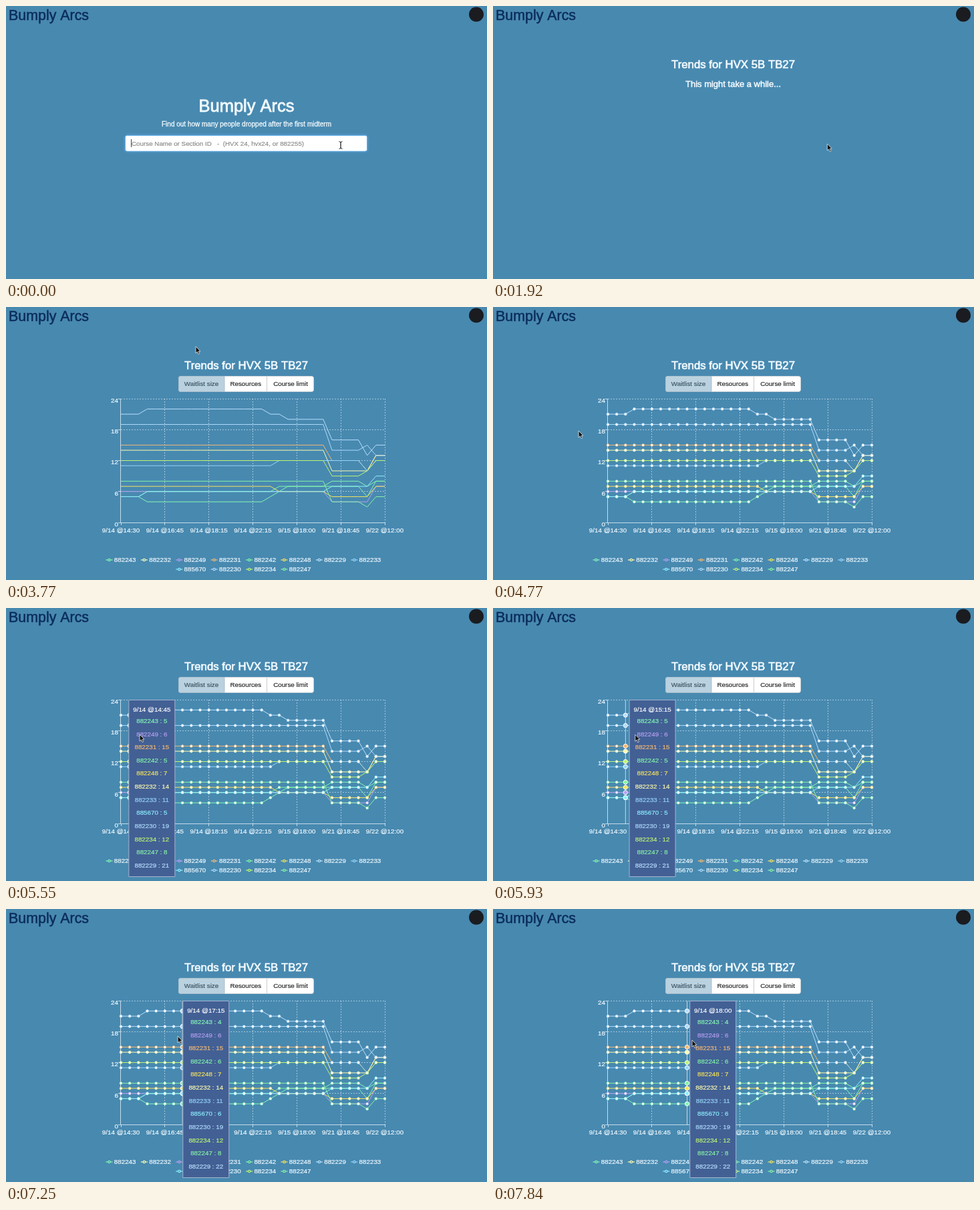
Animation, 720 px wide and 408 px high, one loop 7990 ms. Source, as an HTML page with a canvas:

```html
<!DOCTYPE html>
<html lang="en">
<head>
<meta charset="utf-8">
<title>Course trends</title>
<style>
html, body { margin: 0; width: 100%; height: 100%; overflow: hidden; background: #4889b0; }
canvas { display: block; width: 720px; height: 408px; }
</style>
</head>
<body>
<canvas id="stage" width="720" height="408"></canvas>
<script>
const ctx = document.getElementById('stage').getContext('2d');
const LOOP = 7990;
const FONT = '"Liberation Sans", Arial, sans-serif';
const PALE = '#f3fbff', AXIS = '#c3dbe9', GRID = 'rgba(225,238,246,.6)';
const SITE = 'Bumply Arcs';
const HEADING = 'Trends for HVX 5B TB27';
const HINT = 'Course Name or Section ID   -  (HVX 24, hvx24, or 882255)';
const QUERY = 'hvx 5b';

// Milestones in ms
const BLINK = 440, TYPE_WORD = 680, TYPE_NUMBER = 1390;
const RESULT = 1920, CHART = 2330, DRAW = 2430, DRAW_LEN = 1100, DOTS = 4070;

// Pointer: time, x, y
const pointer = [
  [RESULT, 500.3, 206], [2010, 500.3, 206], [2500, 591, 76], [2800, 591, 76], [3350, 300, 57],
  [3770, 284, 59], [3980, 284, 59], [4770, 128, 185], [5550, 200, 189], [7250, 257, 190], [7840, 298, 196]
];
// Hovered column: time, column
const hover = [[5250, 0], [5530, 1], [6510, 4], [7215, 7], [7780, 9]];
// Sample clock: column, quarter hours after 14:30
const clock = [[0, 0], [1, 1], [4, 8], [7, 11], [9, 14]];

const ticks = ['9/14 @14:30', '9/14 @16:45', '9/14 @18:15', '9/14 @22:15',
  '9/15 @18:00', '9/21 @18:45', '9/22 @12:00'];

// All series hold one level per span of columns and ramp in between
const spans = [[0, 2], [3, 16], [19, 23], [24, 27], [28, 28], [29, 30]];
const series = [
  ['882243', '#83f7b4', 5, 4, 7, 8, 7, 8],
  ['882249', '#b49ff0', 6, 6, 6, 4, 4, 7],
  ['882231', '#f3b870', 15, 15, 15, 12, 10, 13],
  ['882242', '#80f3a8', 5, 6, 7, 7, 5, 8],
  ['882248', '#f5e35a', 7, 7, 6, 5, 5, 7],
  ['882232', '#fdfbae', 14, 14, 14, 10, 10, 13],
  ['882233', '#95d4f8', 11, 11, 12, 12, 10, 12],
  ['885670', '#8ceefd', 5, 6, 6, 7, 7, 9],
  ['882230', '#addafb', 19, 19, 19, 14, 15, 13],
  ['882234', '#bdf572', 12, 12, 12, 9, 10, 12],
  ['882247', '#85f2a5', 8, 8, 8, 4, 3, 5],
  ['882229', '#b8dffc', 21, 22, 20, 16, 13, 15]
].map(([id, color, ...levels]) => {
  const keys = levels.flatMap((v, k) => spans[k].map(col => [col, v]));
  return { id, color, values: Array.from({ length: 31 }, (_, i) => Math.round(track(keys, i))) };
});
const legend = ('882243 882232 882249 882231 882242 882248 882229 882233 ' +
  '885670 882230 882234 882247').split(' ').map(id => series.find(s => s.id === id));

const LEFT = 172, RIGHT = 567, TOP = 137, BOTTOM = 322;
const px = i => LEFT + (RIGHT - LEFT) * i / 30;
const py = v => BOTTOM - (BOTTOM - TOP) * v / 24;
const crisp = v => Math.floor(v) + 0.5;

// Piecewise linear lookup from one column of the keys to another
function track(keys, x, to = 1, from = 0) {
  const i = keys.findIndex(k => k[from] > x);
  if (i === 0) return keys[0][to];
  if (i < 0) return keys[keys.length - 1][to];
  const a = keys[i - 1], b = keys[i];
  return a[to] + (b[to] - a[to]) * (x - a[from]) / (b[from] - a[from]);
}

// Same curve as the CSS "ease" keyword
function ease(t) {
  if (t <= 0) return 0;
  if (t >= 1) return 1;
  let lo = 0, hi = 1, u;
  for (let i = 0; i < 20; i++) {
    u = (lo + hi) / 2;
    if (0.75 * u * (1 - u) + u ** 3 < t) lo = u; else hi = u;
  }
  return 0.3 * u * (1 - u) ** 2 + 3 * u * u * (1 - u) + u ** 3;
}

function text(s, x, y, size, color, align = 'left', weight = 0.2) {
  ctx.font = `${size}px ${FONT}`;
  ctx.textAlign = align;
  ctx.fillStyle = ctx.strokeStyle = color;
  ctx.lineWidth = weight;
  ctx.fillText(s, x, y);
  ctx.strokeText(s, x, y);
}

function line(x1, y1, x2, y2, color, width = 1) {
  ctx.strokeStyle = color;
  ctx.lineWidth = width;
  ctx.beginPath();
  ctx.moveTo(x1, y1);
  ctx.lineTo(x2, y2);
  ctx.stroke();
}

function paint(fill, stroke, width = 1) {
  if (fill) { ctx.fillStyle = fill; ctx.fill(); }
  if (stroke) { ctx.strokeStyle = stroke; ctx.lineWidth = width; ctx.stroke(); }
}

function dot(x, y, r, fill, stroke, width) {
  ctx.beginPath();
  ctx.arc(x, y, r, 0, Math.PI * 2);
  paint(fill, stroke, width);
}

function box(x, y, w, h, r, fill, stroke) {
  ctx.beginPath();
  ctx.roundRect(x, y, w, h, r);
  paint(fill, stroke);
}

function drawPage() {
  ctx.fillStyle = '#4889b0';
  ctx.fillRect(0, 0, 720, 408);
  text(SITE, 4, 21, 21.4, '#0b2d5b', 'left', 0.5);
  dot(704, 12.5, 11, '#1a1c20');
}

function typedCount(t) {
  if (t < TYPE_WORD) return 0;
  if (t < TYPE_NUMBER) return Math.min(3, 1 + Math.floor((t - TYPE_WORD) / 110));
  return 4 + Math.floor((t - TYPE_NUMBER) / 85);
}

function drawHome(t) {
  text(SITE, 360, 158, 25.5, PALE, 'center', 0.8);
  text('Find out how many people dropped after the first midterm', 360, 180, 10, PALE, 'center', 0.3);
  ctx.save();
  ctx.shadowColor = 'rgba(102,175,233,.7)';
  ctx.shadowBlur = 4;
  box(178.5, 193.5, 362, 23.5, 3, '#fff', '#66afe9');
  ctx.restore();
  box(179, 194, 361, 22.5, 2.5, '#fff');

  const typed = QUERY.slice(0, typedCount(t));
  if (typed) text(typed, 188, 208.7, 9.8, '#555');
  else text(HINT, 188, 208.7, 9.8, '#8c8c8c');
  if (typed || t < BLINK) {
    const x = crisp(187.5 + ctx.measureText(typed).width);
    line(x, 199, x, 211, '#444');
  }
  drawBeam(501, 208);
}

function drawBeam(x, y) {
  line(x, y - 5, x, y + 5, '#222', 1.3);
  for (const s of [-1, 1])
    for (const side of [-2.5, 2.5]) line(x + side, y + 5.5 * s, x, y + 4.5 * s, '#222');
}

function drawArrow(t) {
  ctx.save();
  ctx.translate(track(pointer, t, 1), track(pointer, t, 2));
  ctx.beginPath();
  [[0, 0], [0, 10], [2.3, 7.9], [4, 11.6], [5.7, 10.8], [4.1, 7.3], [7, 7.1]]
    .forEach(p => ctx.lineTo(...p));
  ctx.closePath();
  paint('#111', '#e8eef2', 0.8);
  ctx.restore();
}

function drawButtons() {
  box(258.5, 103.5, 202, 23, 3, '#fff', '#c9d3da');
  box(258.5, 103.5, 68.5, 23, [3, 0, 0, 3], '#bad1df', '#a9bfcc');
  line(390.5, 104, 390.5, 126, '#ccc');
  text('Waitlist size', 292.5, 118.4, 9.8, '#3d5666', 'center');
  text('Resources', 358.8, 118.4, 9.8, '#2b2b2b', 'center');
  text('Course limit', 426, 118.4, 9.8, '#2b2b2b', 'center');
}

function drawAxes() {
  ctx.setLineDash([2, 2]);
  for (let v = 6; v <= 24; v += 6) line(LEFT, crisp(py(v)), RIGHT, crisp(py(v)), GRID);
  for (let i = 5; i <= 30; i += 5) line(crisp(px(i)), TOP, crisp(px(i)), BOTTOM, GRID);
  ctx.setLineDash([]);
  line(LEFT - 0.5, TOP, LEFT - 0.5, BOTTOM + 0.5, AXIS);
  line(LEFT, BOTTOM + 0.5, RIGHT, BOTTOM + 0.5, AXIS);
  for (let v = 0; v <= 24; v += 6) {
    line(LEFT - 4, crisp(py(v)), LEFT, crisp(py(v)), AXIS);
    text(v, 168, py(v) + 5.8, 9.9, PALE, 'right');
  }
  ticks.forEach((label, i) => {
    const x = px(i * 5);
    line(crisp(x), BOTTOM, crisp(x), BOTTOM + 4, AXIS);
    text(label, x, 337, 9.8, PALE, 'center');
  });
}

function drawLegend() {
  legend.forEach(({ id, color }, i) => {
    const x = 149.5 + 52.4 * (i < 8 ? i : i - 6), y = i < 8 ? 378 : 392;
    line(x, y, x + 10, y, color, 1.2);
    dot(x + 5, y, 1.7, '#4889b0', color, 1.2);
    text(id, x + 12.3, y + 3.2, 9.8, PALE);
  });
}

function drawLines(t) {
  const shown = ease((t - DRAW) / DRAW_LEN);
  ctx.save();
  ctx.beginPath();
  ctx.rect(LEFT, TOP, (RIGHT - LEFT) * shown, BOTTOM - TOP);
  ctx.clip();
  for (const { values, color } of series) {
    ctx.beginPath();
    values.forEach((v, i) => ctx.lineTo(px(i), py(v)));
    paint(null, color);
  }
  ctx.restore();
  if (t < DOTS) return;
  for (const { values, color } of series)
    values.forEach((v, i) => dot(px(i), py(v), 1.9, '#fff', color, 0.7));
}

function drawTooltip(t) {
  if (t < hover[0][0]) return;
  const at = Math.floor(track(hover, t));
  const since = t - track(hover, at, 0, 1);
  const col = px(at), prev = px(Math.max(0, at - 1));
  line(col, TOP, col, BOTTOM, '#ccd6dc');
  for (const { values, color } of series) dot(col, py(values[at]), 3.1, color, '#fff');

  const x = prev + (col - prev) * ease(since / 200) + 10;
  const mid = x + 35;
  const minutes = 870 + 15 * Math.round(track(clock, at));
  const time = Math.floor(minutes / 60) + ':' + String(minutes % 60).padStart(2, '0');
  box(x + 0.5, 137.5, 69, 264, 0, '#436095', '#a4b5cf');
  text('9/14 @' + time, mid, 155, 9.8, '#fff', 'center');
  series.forEach(({ id, color, values }, i) =>
    text(`${id} : ${values[at]}`, mid, 172 + 19.62 * i, 9.8, color, 'center'));
}

function drawResult(t) {
  text(HEADING, 359.5, 93, 16.8, PALE, 'center', 0.65);
  if (t < CHART) {
    text('This might take a while...', 359.5, 121, 13, PALE, 'center', 0.5);
  } else {
    drawButtons();
    drawAxes();
    drawLegend();
    drawLines(t);
    drawTooltip(t);
  }
  drawArrow(t);
}

const start = performance.now();
function tick() {
  const t = (performance.now() - start) % LOOP;
  drawPage();
  if (t < RESULT) drawHome(t); else drawResult(t);
  requestAnimationFrame(tick);
}
tick();
</script>
</body>
</html>
```
